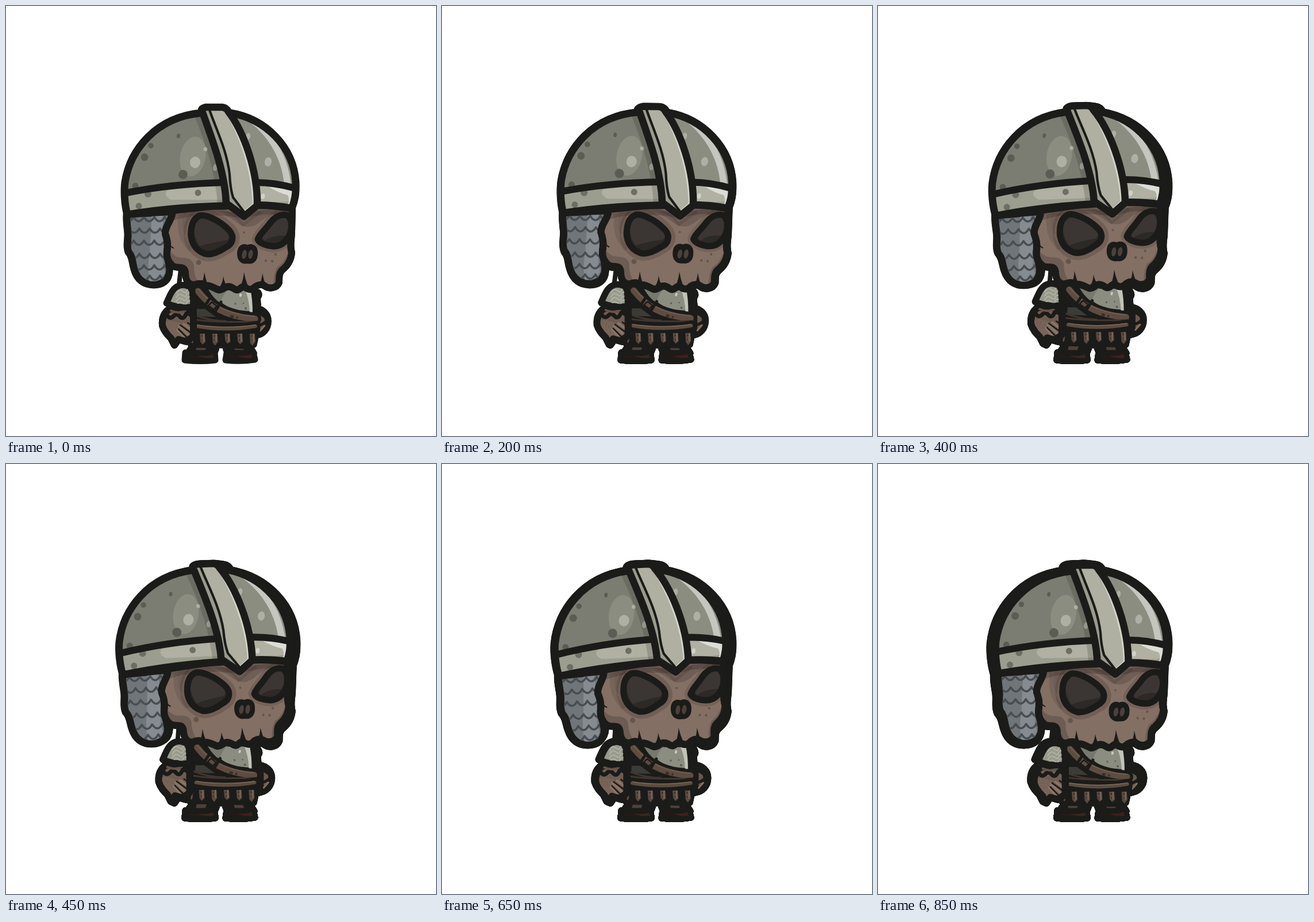
Animation, 748 px wide and 748 px high, one loop 900 ms. Source, as an HTML page with a canvas:

```html
<!DOCTYPE html>
<html lang="en">
<head>
<meta charset="utf-8">
<title>Idle skull warrior</title>
<style>
html, body { margin: 0; width: 100%; height: 100%; overflow: hidden; background: #fff; }
canvas { display: block; width: 748px; height: 748px; }
</style>
</head>
<body>
<canvas id="stage" width="748" height="748"></canvas>
<script>
const ctx = document.getElementById('stage').getContext('2d');
const INK = '#1b1b19';
const LOOP = 900, STEP = 50;
const P = d => new Path2D(d);

const helmet = P('M211 363C206 345 205 322 207 306C216 250 261 193 340 186L390 186C452 196 500 245 504 306C505 328 502 340 497 352Q462 345 414 347Q300 348 211 363Z');
const crest = P('M340 180Q342 177 348 176L376 176Q384 177 387 184C413 218 438 285 437 347L414 366L383 343C381 290 360 235 340 180Z');
const flap = P('M210 362C209 378 212 388 212 398C212 410 209 418 213 428C221 437 219 446 223 458C228 476 240 485 257 485C272 485 283 478 284 462C286 450 279 440 280 428C282 415 281 408 277 396C276 382 290 372 290 358Z');
const skull = P('M290 356C290 372 276 382 277 396C281 408 282 415 280 428C279 440 284 447 290 452C299 458 310 450 312 463C312 478 318 485 327 485C336 482 341 482 347 487C356 485 362 491 370 494C378 494 380 488 387 488C394 488 397 494 402 494C408 493 409 488 414 488C421 494 428 495 434 488C440 484 446 484 450 487C458 493 471 491 475 481C475 469 475 463 483 457C491 450 496 440 497 429C493 415 497 406 497 392L498 352L414 342Z');
const eyeL = P('M336 365C347 361 373 374 388 390C398 401 395 414 382 420C372 427 357 434 346 431C326 424 320 406 322 390C323 378 328 369 336 365Z');
const eyeR = P('M438 406C440 398 452 388 459 378C467 367 478 361 489 364C498 370 498 385 494 396C488 410 478 418 465 418C453 417 441 413 438 406Z');
const nose = P('M420 421C427 417 434 420 433 431C433 441 427 445 420 443C413 445 407 441 407 431C407 420 413 417 420 421Z');

const sleeve = P('M279 517C285 504 289 491 300 487C309 483 322 487 324 496L326 523C310 526 292 523 279 517Z');
const handL = P('M284 527C274 534 271 544 272 556C275 566 281 572 287 578L293 590L300 580L314 584L326 574L326 527Z');
const armR = P('M436 526C446 528 456 535 456 548C456 562 446 572 436 572Z');
const shoulderR = P('M432 494L440 497Q444 503 439 508L440 520L432 524Z');
const torso = P('M334 492L434 492L436 550L438 562L432 590L420 592L326 590L324 560L330 530Z');
const chest = P('M350 492L425 492Q429 510 429 534L398 531Q370 522 350 492Z');
const legs = P('M320 582L366 582L366 597L362 606L315 604L322 594ZM382 582L426 582L426 594L432 604L386 606L382 597Z');
const footL = P('M312 603Q338 605 363 603L364 616Q338 619 311 616Z');
const footR = P('M384 603Q408 605 430 603L433 615Q408 619 382 616Z');
const neck = P('M304 458L301 484');

function fill(path, color) {
  ctx.fillStyle = color;
  ctx.fill(path);
}

function line(path, width, color = INK) {
  ctx.strokeStyle = color;
  ctx.lineWidth = width;
  ctx.stroke(path);
}

function shape(path, color, width) {
  fill(path, color);
  line(path, width);
}

function inside(path, draw) {
  ctx.save();
  ctx.clip(path);
  draw();
  ctx.restore();
}

function spots(color, list) {
  ctx.fillStyle = color;
  for (const [x, y, rx, ry = rx] of list) {
    ctx.beginPath();
    ctx.ellipse(x, y, rx, ry, 0.2, 0, 7);
    ctx.fill();
  }
}

function shifted(x, y, draw) {
  ctx.save();
  ctx.translate(x, y);
  draw();
  ctx.restore();
}

const wave = (t, peak) => Math.cos(2 * Math.PI * (t - peak) / LOOP);

// Breath rises for 500 ms and falls for 400 ms.
function pose(t) {
  const u = t < 500 ? t / 500 : (LOOP - t) / 400;
  return {
    breath: (1 - Math.cos(Math.PI * u)) / 2,
    x: 8.1 * (wave(t, 110) - wave(0, 110)),
    y: -1.2 * (wave(t, 290) - wave(0, 290)),
    tilt: 2 * (wave(0, 130) - wave(t, 130)) * Math.PI / 180
  };
}

function place(p, parts) {
  const b = p.breath;
  parts.feet();
  shifted(6.5 * b, -2 * b, parts.right);
  shifted(-1.5 * b, -3 * b, parts.torso);
  shifted(-6.5 * b, -3 * b, parts.left);
  shifted(328 + p.x, 272 + p.y, () => {
    ctx.rotate(-p.tilt);
    ctx.translate(-328, -272);
    parts.head();
  });
}

const solid = (width, ...paths) => () => paths.forEach(s => shape(s, INK, width));
const shadow = {
  feet: solid(11, legs, footL, footR),
  right: solid(12, armR),
  torso: solid(9, torso, shoulderR),
  left: solid(12, sleeve, handL),
  head: solid(13, flap, skull, helmet, crest)
};

function drawFeet() {
  shape(legs, INK, 10);
  fill(P('M332 590L350 590L346 600L330 600ZM396 590L412 590L414 600L398 600Z'), '#4e4038');
  shape(footL, '#2a1a16', 11);
  shape(footR, '#2b1715', 11);
  fill(P('M334 608Q350 610 360 606L362 612Q345 614 334 608Z'), '#36271f');
  fill(P('M404 608Q418 609 427 605L429 612Q412 614 404 608Z'), '#3f1f1c');
}

function drawRight() {
  shape(armR, '#69574c', 12);
  line(P('M436 533Q446 536 453 543M438 556Q448 554 454 547'), 5);
  line(P('M442 565L450 556'), 3, '#84705f');
}

function drawTorso() {
  shape(shoulderR, '#4b4c46', 8);
  shape(torso, INK, 9);
  fill(P('M333 494L347 505L334 511Z'), '#4b4039');
  fill(P('M331 527L346 527L365 541L330 540Z'), '#3b3b37');
  shape(chest, '#8b8d80', 5);
  inside(chest, () => {
    fill(P('M350 490L390 490Q374 503 372 525Z'), '#77796e');
    fill(P('M414 490L429 490L431 536L424 536Q424 510 414 490Z'), '#c2c4ba');
    spots('#5d5f56', [[399, 518, 1.7], [417, 526, 2], [413, 517, 1.3]]);
    spots('#c9cac2', [[408, 503, 2, 3]]);
  });
  const strap = P('M334 496C352 519 377 540 433 544');
  line(strap, 22);
  line(strap, 11, '#5f4c40');
  line(P('M335 493C355 517 380 535 432 540'), 2, '#6f5c50');
  line(P('M355 508L345 523M374 515L363 533'), 5);
  line(P('M358 515L367 522L361 528L352 521Z'), 2.5);
  spots('#3c3029', [[393, 540, 3.5, 2.5], [402, 542, 2]]);

  line(P('M326 537Q354 548 382 548M326 545Q360 551 437 549'), 3, '#40362f');
  line(P('M330 556Q382 566 435 556'), 16);
  line(P('M332 557Q382 566 434 557'), 6, '#5c4b3f');
  line(P('M333 555Q382 562 434 555'), 1.5, '#7a685b');

  for (let i = 0; i < 5; i++) {
    const x = 342 + i * 21.7;
    const h = 589 + 2 * Math.sin(i * 2);
    fill(P(`M${x - 5} 570h9l1 14L${x} ${h}l-4 -5Z`), '#594a40');
    line(P(`M${x + 2} 571v12`), 2.5, '#786558');
    spots('#302822', [[x - 1, 574, 1.2], [x - 1, 581, 1]]);
  }
  line(P('M326 574L324 585'), 3, '#5d4c42');
}

function drawLeft() {
  shape(handL, '#6f5c51', 12);
  inside(handL, () => {
    fill(P('M272 550Q283 544 303 552L318 573L295 580Z'), '#786458');
    for (let i = 0; i < 28; i++) {
      const a = i * 2.4, r = 2.6 * Math.sqrt(i);
      spots('#625147', [[289 + r * Math.cos(a), 554 + r * 0.8 * Math.sin(a), 0.7]]);
    }
  });
  line(P('M301 557L318 572M309 553L321 562M298 563L309 576'), 4, '#8b7567');
  line(P('M303 555L321 568M300 562L314 576M316 551L323 556'), 2.5);
  line(handL, 12);
  line(P('M277 533Q284 547 291 540Q297 533 303 541Q309 546 313 536Q318 533 324 540'), 7);
  line(P('M287 530Q300 536 312 530'), 4, '#665348');
  shape(sleeve, '#989a8b', 11);
  inside(sleeve, () => {
    fill(P('M275 518Q290 512 294 486L284 486Z'), '#85877a');
    for (let i = 0; i < 4; i++)
      line(P(`M296 ${500 + i * 7}q5 -9 11 -4t7 0t9 -4`), 2, '#b0b1a4');
  });
  line(sleeve, 10);
}

function drawFlap() {
  shape(flap, '#70757a', 13);
  inside(flap, () => {
    fill(P('M254 360L286 360Q271 382 275 402L273 440L278 462Q266 482 250 482Q245 455 250 430Z'), '#858b90');
    fill(P('M272 360L290 360L280 480L273 450Q276 400 272 360Z'), '#6f757a');
    [367, 387, 408, 431, 451, 469].forEach((y, row) => {
      let d = `M${204 - row % 2 * 8} ${y}`;
      for (let i = 0; i < 6; i++) d += 'q9 15 18 0';
      line(P(d), 3.6, '#484d51');
    });
  });
  line(flap, 12);
}

function drawSkull() {
  shape(skull, '#836f64', 12);
  inside(skull, () => {
    fill(P('M282 420Q290 438 308 438Q325 438 327 452Q325 462 334 480L310 484L276 450Z'), '#6d5c53');
    fill(P('M499 405Q488 446 472 454Q465 465 465 490L502 490Z'), '#6d5c53');
    fill(P('M290 340L500 340L498 372Q470 350 439 378Q419 391 402 377Q370 351 331 358Q312 372 312 400Q302 384 306 362L286 366Z'), '#6f5e55');
    line(P('M304 364Q298 398 319 422'), 8, '#75645a');
    line(eyeL, 25, 'rgba(65,52,45,.28)');
    line(eyeR, 21, 'rgba(65,52,45,.22)');
    line(P('M360 352Q397 357 412 381Q426 370 442 359'), 5, 'rgba(50,40,35,.2)');
    line(P('M284 371Q340 352 414 366Q455 353 498 362'), 8, 'rgba(25,22,20,.22)');
    spots('#66554b', [[335, 446, 4.5], [414, 394, 2], [452, 443, 2.2], [463, 444, 2.2], [469, 432, 2.2]]);
  });
  line(skull, 12);
  line(P('M284 416L291 421'), 2);
  for (const [x, y] of [[346, 463], [379, 470], [415, 463], [447, 465]])
    fill(P(`M${x - 1} ${y}Q${x + 1} ${y + 12} ${x + 6} 488L${x - 7} 488Q${x - 2} ${y + 12} ${x - 1} ${y}Z`), INK);

  for (const eye of [eyeL, eyeR]) {
    fill(eye, '#2c2927');
    inside(eye, () => {
      fill(P('M325 362L398 390L385 407Q350 413 337 418Q324 398 325 362ZM443 395L480 360L500 360L492 400Q463 397 449 409Z'), '#3b3633');
    });
    line(eye, 11);
  }
  shape(nose, INK, 10);
  spots('#4a413c', [[414.5, 432, 4, 8]]);
  spots('#4a413c', [[425.5, 432, 4, 8]]);
}

function drawHelmet() {
  fill(helmet, '#7b7d72');
  inside(helmet, () => {
    fill(P('M386 180L510 180L510 360L420 360Z'), '#8b8d80');
    spots('#8b8d80', [[325, 262, 22, 35]]);
    fill(P('M398 185C455 200 490 250 496 312L484 311C480 262 452 214 398 185Z'), '#c5c6c0');
    spots('#5b5d54', [[300, 226, 3, 4], [252, 243, 4.8], [241, 263, 6.5], [308, 293, 8], [225, 313, 5.5]]);
    spots('#aeb0a6', [[329, 272, 9, 10], [347, 249, 3.5], [456, 271, 6, 8], [421, 227, 4, 6], [364, 281, 4, 6]]);

    fill(P('M200 326Q290 310 390 308L390 352L200 372ZM430 308L510 320L510 358L430 352Z'), '#9b9d8e');
    fill(P('M284 318Q330 312 390 310L390 337L287 337Q270 328 284 318Z'), '#b0b1a2');
    fill(P('M430 308L510 320L510 338Q470 344 430 338Z'), '#b0b1a2');
    fill(P('M456 314L510 322L510 358L488 350Q495 338 490 329Q474 325 456 314Z'), '#dcddd6');
    spots('#6d6f65', [[247, 327, 6], [231, 348, 5.5], [334, 325, 5.5]]);
    spots('#d0d1c8', [[447, 331, 3.5, 5]]);
    line(P('M333 186C354 235 372 290 375 346'), 14, 'rgba(30,30,27,.18)');
  });
  line(P('M209 325Q290 309 382 307M434 307Q468 307 503 317'), 12);
  line(helmet, 13);

  fill(crest, '#afb0a1');
  inside(crest, () => {
    fill(P('M340 177L354 177C378 235 390 285 393 331L414 360L384 346Z'), '#999b8c');
    line(P('M382 180C407 222 430 285 431 345L414 360'), 5, '#d3d4ca');
    line(P('M353 178C366 216 384 250 389 293Q390 317 395 333L414 358'), 4.2);
  });
  line(crest, 12.5);
}

const figure = {
  feet: drawFeet,
  right: drawRight,
  torso: drawTorso,
  left: drawLeft,
  head() {
    line(neck, 8);
    drawFlap();
    drawSkull();
    drawHelmet();
  }
};

ctx.lineJoin = ctx.lineCap = 'round';

// Dark outlines of earlier poses stay until the loop restarts.
function render(step) {
  ctx.clearRect(0, 0, 748, 748);
  for (let i = 0; i < step; i++) place(pose(i * STEP), shadow);
  place(pose(step * STEP), figure);
}

const start = performance.now();
let last = -1;
function tick() {
  const step = Math.floor((performance.now() - start) % LOOP / STEP);
  if (step !== last) render(last = step);
  requestAnimationFrame(tick);
}
tick();
</script>
</body>
</html>
```
